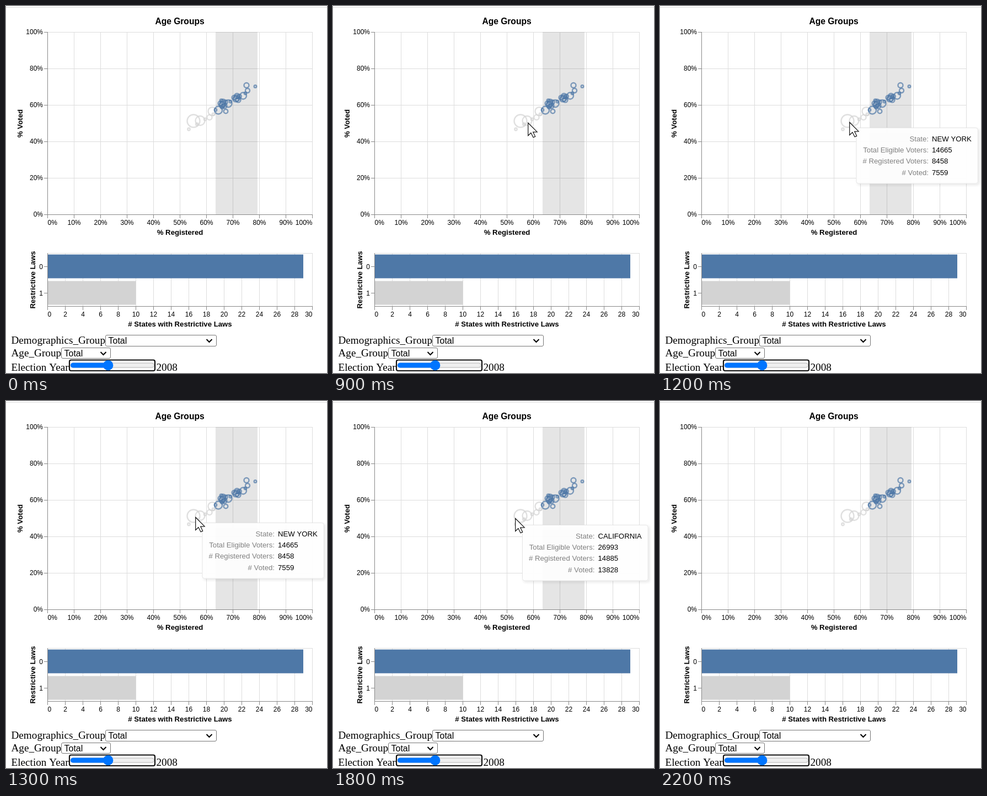
Recreate the animation shown at these times as an HTML page with a canvas. Size 582 px wide and 664 px high, loop 3000 ms.

```html
<!DOCTYPE html>
<html lang="en">
<head>
<meta charset="utf-8">
<title>Age Groups</title>
<style>
  html, body { margin: 0; width: 100%; height: 100%; overflow: hidden; background: #fff; }
  canvas { display: block; }
</style>
</head>
<body>
<canvas id="stage" width="582" height="664"></canvas>
<script>
const ctx = document.getElementById('stage').getContext('2d');
const SANS = '"Liberation Sans", Arial, sans-serif';
const SERIF = '"Liberation Serif", "Times New Roman", serif';
const LABEL = '12px ' + SANS;
const AXIS_TITLE = 'bold 13.2px ' + SANS;
const BLUE = '#4e78a7', PALE = '#d3d3d3', GRID = '#ddd', AXIS = '#888';
const LOOP = 3000, STEP = 100;

const keys = ['State:', 'Total Eligible Voters:', '# Registered Voters:', '# Voted:'];
const newYork = ['NEW YORK', 14665, 8458, 7559];
const california = ['CALIFORNIA', 26993, 14885, 13828];

function text(str, x, y, font, align = 'left', color = '#000') {
  ctx.font = font;
  ctx.textAlign = align;
  ctx.fillStyle = color;
  ctx.fillText(str, x, y);
}

function turnedText(str, x, y, font) {
  ctx.save();
  ctx.translate(x, y);
  ctx.rotate(-Math.PI / 2);
  text(str, 0, 0, font, 'center');
  ctx.restore();
}

function rect(x, y, w, h, color) {
  ctx.fillStyle = color;
  ctx.fillRect(x, y, w, h);
}
const hLine = (x, y, w, color) => rect(x, y, w, 1, color);
const vLine = (x, y, h, color) => rect(x, y, 1, h, color);

function box(x, y, w, h, r, fill, stroke, width = 1) {
  ctx.beginPath();
  ctx.roundRect(x, y, w, h, r);
  if (fill) { ctx.fillStyle = fill; ctx.fill(); }
  if (stroke) { ctx.strokeStyle = stroke; ctx.lineWidth = width; ctx.stroke(); }
}

// Labels at both ends stay flush with the axis
function xLabels(count, y, label) {
  for (let i = 0; i <= count; i++) {
    const align = i === 0 ? 'left' : i === count ? 'right' : 'center';
    text(label(i), 75.5 + 480 * i / count, y, LABEL, align);
  }
}

function ring(x, y, r) {
  ctx.beginPath();
  ctx.arc(x, y, r, 0, Math.PI * 2);
  ctx.stroke();
}

// Small rings evenly spaced along the trend
function trail(x, y, dx, dy, count) {
  for (let i = 0; i < count; i++) ring(x + dx * i, y + dy * i, 2.2);
}

// Golden-angle spiral of shrinking rings
function cluster(x, y, count) {
  for (let i = 0; i < count; i++) {
    const a = i * 2.4, d = 2.5 * Math.sqrt(i);
    ring(x + d * Math.cos(a), y + d * Math.sin(a), 5.6 - 0.4 * i);
  }
}

function rings() {
  ctx.save();
  ctx.globalAlpha = 0.7;
  ctx.lineWidth = 2.4;

  ctx.strokeStyle = PALE;
  ring(340, 208, 11.5);
  ring(352, 207.5, 8.5);
  ring(374, 190.5, 7.5);
  ring(369, 201.5, 4.6);
  trail(331.5, 223, 14.8, -9, 4);

  ctx.strokeStyle = BLUE;
  ring(385, 188.5, 7);
  ring(403, 176.5, 6.5);
  ring(430, 162.5, 6);
  ring(436, 143.5, 4.5);
  ring(438, 153, 4);
  ring(452, 145.5, 2.3);
  ring(398.5, 190.5, 3.8);
  cluster(393.5, 177, 8);
  cluster(418.5, 166.5, 6);
  trail(380, 188, 13.5, -7.5, 5);
  ctx.restore();
}

function scatter() {
  text('Age Groups', 315, 32.5, 'bold 15.6px ' + SANS, 'center');
  for (let i = 0; i <= 10; i++) vLine(75 + 48 * i, 47, 331, GRID);
  for (let i = 0; i <= 5; i++) hLine(75, 47 + 66 * i, 481, GRID);
  rect(380, 47, 76, 330, 'rgba(51,51,51,.125)');
  for (let i = 0; i <= 10; i++) vLine(75 + 48 * i, 377, 7, AXIS);
  for (let i = 0; i <= 5; i++) {
    hLine(69, 47 + 66 * i, 6, AXIS);
    text(100 - 20 * i + '%', 67, 51 + 66 * i, LABEL, 'right');
  }
  hLine(75, 377, 481, AXIS);
  vLine(75, 47, 331, AXIS);
  xLabels(10, 396, i => i * 10 + '%');
  text('% Registered', 315.5, 413.5, AXIS_TITLE, 'center');
  turnedText('% Voted', 29.5, 212.5, AXIS_TITLE);
  rings();
}

function bars() {
  hLine(75, 447, 481, GRID);
  for (let i = 0; i <= 15; i++) {
    vLine(75 + 32 * i, 447, 97, GRID);
    vLine(75 + 32 * i, 543, 7, AXIS);
  }
  rect(75, 449.6, 464, 43, BLUE);
  rect(75, 497.6, 160.5, 43, PALE);
  hLine(75, 543, 481, AXIS);
  vLine(75, 447, 97, AXIS);
  for (let i = 0; i < 2; i++) {
    hLine(69, 471 + 48 * i, 6, AXIS);
    text(i, 67, 475.5 + 48 * i, LABEL, 'right');
  }
  xLabels(15, 562, i => i * 2);
  text('# States with Restrictive Laws', 315.5, 579.5, AXIS_TITLE, 'center');
  turnedText('Restrictive Laws', 53, 495.5, AXIS_TITLE);
}

function select(x, y, w, h) {
  box(x + 0.5, y + 0.5, w - 1, h - 1, 2.5, '#fff', '#767676');
  text('Total', x + 5.5, y + 15.5, '16px ' + SANS);
  ctx.beginPath();
  ctx.moveTo(x + w - 18.5, y + 8);
  ctx.lineTo(x + w - 13.5, y + 13);
  ctx.lineTo(x + w - 8.5, y + 8);
  ctx.strokeStyle = '#000';
  ctx.lineWidth = 2;
  ctx.stroke();
}

function controls() {
  const font = '19.2px ' + SERIF;
  text('Demographics_Group', 9.5, 611, font);
  select(180, 595, 202, 21);
  text('Age_Group', 9.5, 634, font);
  select(100, 618, 90, 20);
  text('Election Year', 9.5, 660, font);
  box(115, 640.5, 155, 19.5, 3, '#fff', '#101010', 2.2);
  box(117.5, 646, 151, 8, 4, '#efefef', '#b2b2b2');
  box(117, 645.5, 70, 9, 4.5, '#0075ff');
  box(176, 640.8, 18.4, 18.4, 9.2, '#0075ff');
  text('2008', 272.5, 660, font);
}

function tooltip(values, x, y) {
  const font = '13.2px ' + SANS;
  ctx.font = font;
  const w = 149.5 + ctx.measureText(values[0]).width;
  ctx.save();
  ctx.shadowColor = 'rgba(0,0,0,.1)';
  ctx.shadowBlur = 4.8;
  ctx.shadowOffsetX = ctx.shadowOffsetY = 2.4;
  box(x, y, w, 101.5, 3.6, 'rgba(255,255,255,.95)');
  ctx.restore();
  box(x + 0.5, y + 0.5, w - 1, 100.5, 3.6, null, '#e5e5e5');
  keys.forEach((key, i) => {
    const base = y + 25 + 20.2 * i;
    text(key, x + 131.5, base, font, 'right', '#808080');
    text(values[i], x + 137.5, base, font);
  });
}

function pointer(x, y) {
  const shape = [[0, 0], [0, 23], [5.2, 18], [9.4, 26.3], [13, 24.6], [9, 16.6], [16.4, 16.4]];
  ctx.beginPath();
  for (const [dx, dy] of shape) ctx.lineTo(x + 0.7 + dx, y + 0.5 + dy);
  ctx.closePath();
  ctx.fillStyle = '#fff';
  ctx.fill();
  ctx.strokeStyle = '#111';
  ctx.lineWidth = 1.2;
  ctx.stroke();
}

function hover(t) {
  const stepsFrom = ms => Math.floor((t - ms) / STEP);
  if (t < 400 || t >= 2200) return;

  if (t < 1000) {
    // Glide in, slowing down
    const left = 1 - stepsFrom(400) / 5;
    pointer(353 + 153 * left ** 2, 211 + 34 * left ** 3);
  } else if (t < 1700) {
    // Drift left, then rest
    const k = Math.min(stepsFrom(1000), 2);
    const x = 351 - 4 * k;
    tooltip(newYork, x + 12.5, 220);
    pointer(x, 207 + 1.5 * k);
  } else {
    // Turn back with constant acceleration; the tooltip stops following
    const k = stepsFrom(1700);
    const xAt = n => 338.5 - 14.5 * n + 6 * n * n;
    const held = Math.min(k, 2);
    if (k < 4) tooltip(california, xAt(held) + 13, 222 + 2 * held);
    pointer(xAt(k), 211 + k);
  }
}

function draw(t) {
  rect(0, 0, 582, 664, '#fff');
  hLine(0, 2, 582, GRID);
  scatter();
  bars();
  controls();
  hover(t);
}

const start = performance.now();
function tick() {
  draw((performance.now() - start) % LOOP);
  requestAnimationFrame(tick);
}
tick();
</script>
</body>
</html>
```
